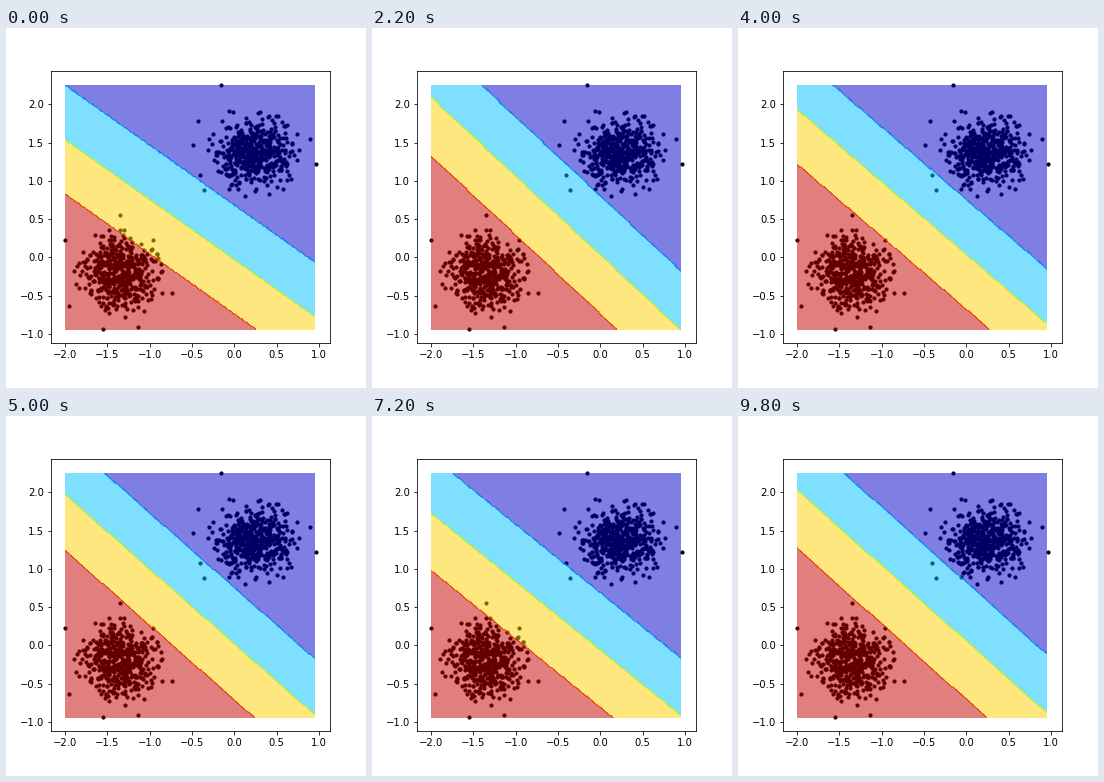
Write a matplotlib script that moves like this. It is 360x360 px and loops after 10 s.

```python
import numpy as np
import matplotlib.pyplot as plt
from matplotlib.animation import FuncAnimation

FRAMES, INTERVAL = 50, 200
X0, Y0, SX, SY = 228.4, 229.45, 84.65, 76.6   # stage position of (0, 0), pixels per unit

# Outermost points, in stage pixels
OUTER = [(215, 57), (310, 136), (304, 111), (192, 93), (187, 117), (223, 83),
         (194, 147), (198, 162), (59, 212), (97, 301), (114, 187), (132, 299),
         (166, 265), (63, 278)]

# Poses of the separating line: frame, slope, height at x = -2, band width
POSES = [(0, -0.783, 1.540, 0.710),
         (11, -1.030, 2.094, 0.770),
         (20, -0.948, 1.936, 0.716),
         (30, -1.002, 2.009, 0.749),
         (36, -0.894, 1.728, 0.748),
         (44, -1.102, 2.243, 0.788),
         (49, -0.986, 2.033, 0.764)]
TIMES, *TRACKS = np.array(POSES).T

LEVELS = np.linspace(0, 3.2, 9)
LEVELS[[0, 5]] -= 0.01   # keep whole-number zones inside their own band
COLORS = plt.get_cmap("jet")((np.arange(8) + 0.5) / 8)


def to_data(px, py):
    return (np.asarray(px) - X0) / SX, (Y0 - np.asarray(py)) / SY


def cloud(rng, center, spread, count=485, reach=2.65):
    pts = rng.standard_normal((count * 2, 2))
    pts = pts[np.hypot(*pts.T) < reach][:count]
    return pts * spread + center


plt.rcParams["font.family"] = "DejaVu Sans"
plt.rcParams["font.size"] = 10
fig, ax = plt.subplots(figsize=(5, 5), dpi=72)
fig.subplots_adjust(left=0.125, right=0.9, bottom=0.125, top=0.88)
fig.set_facecolor("white")

xlim, ylim = to_data([45, 324], [315, 43.2])
ax.set_xlim(*xlim)
ax.set_ylim(*ylim)
ax.set_xticks(np.arange(-2, 1.1, 0.5))
ax.set_yticks(np.arange(-1, 2.1, 0.5))

rng = np.random.default_rng(4)
dots = np.vstack([cloud(rng, (247.5, 124.5), (18.7, 16.8)),
                  cloud(rng, (113, 245), (19.3, 17.2)),
                  OUTER])
ax.scatter(*to_data(*(dots + 0.3).T), s=10, c="black", linewidths=1)

xx, yy = np.meshgrid(np.linspace(-2, 0.95, 198), np.linspace(-0.937, 2.241, 213))
fill = None


def update(i):
    global fill
    if fill is not None:
        fill.remove()
    slope, height, width = (np.interp(i, TIMES, track) for track in TRACKS)
    offset = yy - height - slope * (xx + 2)
    zone = sum((offset < k * width).astype(float) for k in (-1, 0, 1))
    fill = ax.contourf(xx, yy, zone, levels=LEVELS, colors=COLORS, alpha=0.5)
    return [fill]


anim = FuncAnimation(fig, update, frames=FRAMES, interval=INTERVAL,
                     repeat=True, repeat_delay=0, blit=False)
plt.show()
```
